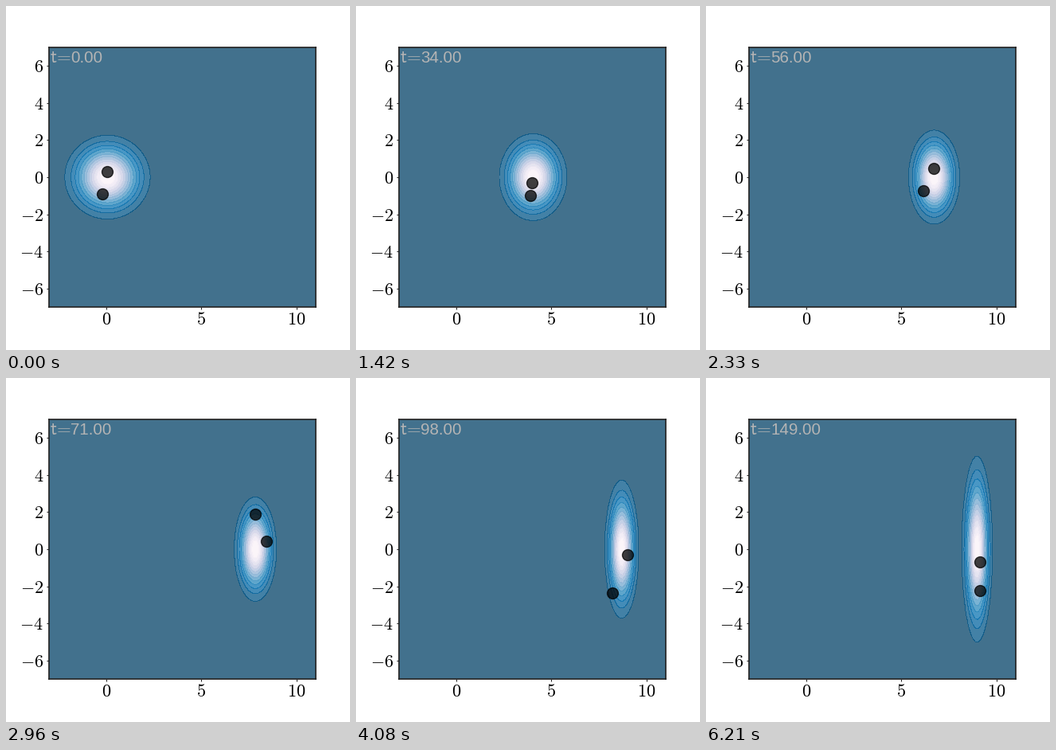
A matplotlib script that plays this animation: 432 by 432 pixels, repeating every 6290 ms.

```python
import numpy as np
import matplotlib.pyplot as plt
from matplotlib.animation import FuncAnimation

plt.rcParams["mathtext.fontset"] = "cm"

LOOP_MS = 6290
FRAMES = 152
LAST = 149
ALPHA = 0.75
INK = "#262626"
GREY = "#b4b4b4"


def glide(t, start, end, mid, rate):
    """Logistic approach from start (at t = 0) to end."""
    left = (1 + np.exp(-rate * mid)) / (1 + np.exp(rate * (t - mid)))
    return end + (start - end) * left


def gaussian(t):
    """Mean x, sigma x and sigma y at step t."""
    return (glide(t, 0.07, 9.0, 31.5, 0.053),
            glide(t, 0.989, 0.35, 42.5, 0.05),
            glide(t, 0.997, 2.3, 98, 0.053))


noise = np.random.default_rng(7).standard_normal((LAST + 1, 2, 2)).clip(-2.2, 2.2)
X, Y = np.meshgrid(np.linspace(-3, 11, 100), np.linspace(-7, 7, 100))
LEVELS = np.linspace(0, 1, 14)

fig = plt.figure(figsize=(4.32, 4.32), dpi=100, facecolor="white")
ax = fig.add_axes([0.125, 0.125, 0.775, 0.755])
ax.set(xlim=(-3, 11), ylim=(-7, 7))

xticks, yticks = range(0, 11, 5), range(-6, 7, 2)
ax.set_xticks(xticks, [f"${v}$" for v in xticks])
ax.set_yticks(yticks, [f"${v}$" for v in yticks])
ax.tick_params(length=2, width=0.8, labelsize=16, color=INK)
ax.tick_params(axis="x", pad=2)
ax.tick_params(axis="y", pad=3)
for spine in ax.spines.values():
    spine.set(linewidth=1.25, edgecolor=INK)

dots = ax.scatter([0, 0], [0, 0], s=100, c="black", edgecolors="black",
                  linewidths=1, alpha=ALPHA, zorder=3)

# negative spaces cancel the padding around the equals sign
ax.text(-2.95, 6.18, r"$\mathsf{t\hspace{-0.2}=\hspace{-0.2}}$",
        fontsize=16.5, color=GREY, zorder=4)
clock = ax.text(-1.87, 6.18, "", family="Liberation Sans",
                fontsize=14.8, color=GREY, zorder=4)
cloud = None


def draw(i):
    global cloud
    t = min(i, LAST)
    mx, sx, sy = gaussian(t)
    density = np.exp(-((X - mx) / sx) ** 2 / 2 - (Y / sy) ** 2 / 2)
    if cloud is not None:
        cloud.remove()
    cloud = ax.contourf(X, Y, density, levels=LEVELS, cmap="PuBu_r", alpha=ALPHA)
    dots.set_offsets(noise[t] * (sx, sy) + (mx, 0))
    clock.set_text(f"{t:.2f}")
    return cloud, dots, clock


anim = FuncAnimation(fig, draw, frames=FRAMES, init_func=lambda: draw(0),
                     interval=LOOP_MS / FRAMES, repeat=True, repeat_delay=0)
plt.show()
```
